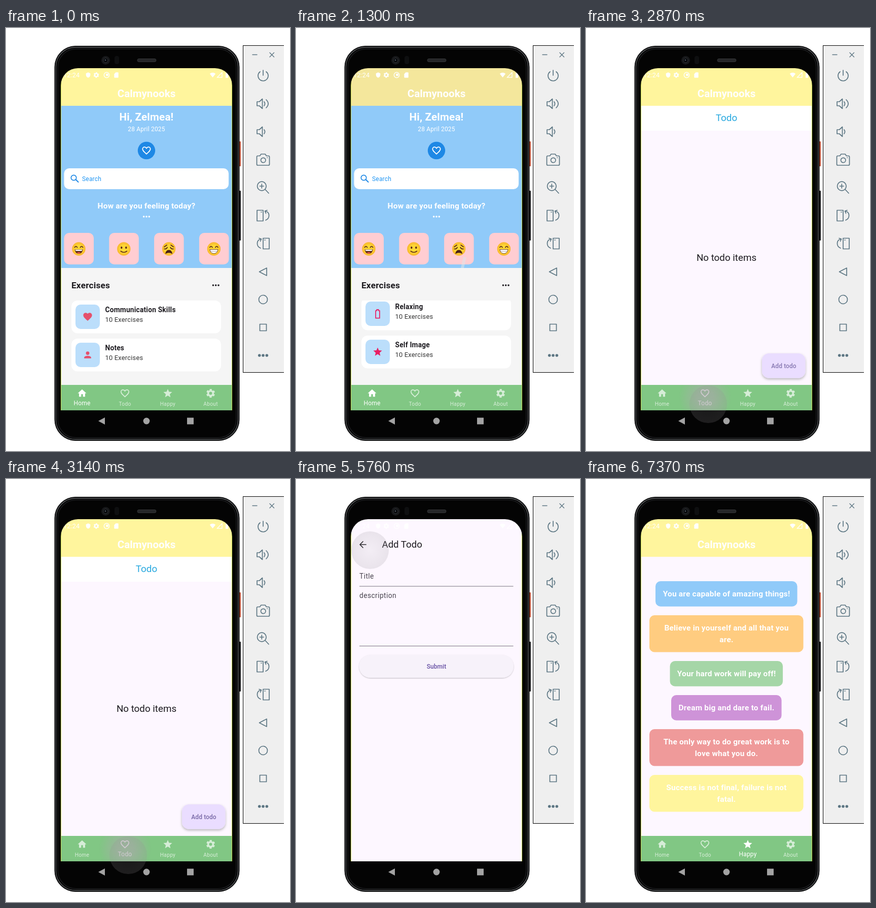
An HTML page for the animation above (8000 ms loop, 560 by 832 pixels).

```html
<!DOCTYPE html>
<html lang="en">
<head>
<meta charset="utf-8">
<title>Mood app demo</title>
<style>
html, body { margin: 0; width: 100%; height: 100%; overflow: hidden; background: #fff; }
svg { display: block; width: 560px; height: 832px; font-family: Roboto, sans-serif; }
.mid { text-anchor: middle; }
.line { fill: none; stroke: currentColor; stroke-linecap: round; stroke-linejoin: round; }

#home, #todo, #add, #happy, #list, #todo .fab-label, .bar, .tap, .swipe, .ghost, .tint, .glow, .press {
  animation: 8s linear infinite;
}
#todo, #add { transform-origin: 277px 415px; }
#home { animation-name: home; animation-timing-function: step-end; }
#happy { animation-name: happy; animation-timing-function: step-end; }
#todo { animation-name: todo; }
#add { animation-name: add; }
#list { animation-name: scroll; }
.tint { animation-name: tint; animation-timing-function: step-end; }
.bar { animation-name: bar; }
#todo .fab-label { animation-name: label; }
.press { animation-name: press; }
.swipe { fill: none; stroke: #e6ebee; stroke-width: 8; stroke-opacity: .6; stroke-dasharray: 50 400; animation-name: swipe; }
.ghost { fill: #dfe6ea; fill-opacity: .55; animation-timing-function: step-end; }
.up { animation-name: ghost-up; }
.down { animation-name: ghost-down; }
.tap-todo { animation-name: tap-todo; }
.tap-fab { animation-name: tap-fab; }
.tap-back { animation-name: tap-back; }
.tap-happy { animation-name: tap-happy; }

@keyframes home { 0% { visibility: visible } 35.125%, 100% { visibility: hidden } }
@keyframes happy { 0% { visibility: hidden } 87%, 100% { visibility: visible } }
@keyframes todo {
  0%, 53.75% { transform: scale(1); animation-timing-function: cubic-bezier(.2, 0, 0, 1) }
  58%, 72.87% { transform: scale(1.05) }
  72.875% { transform: scale(1.1); animation-timing-function: cubic-bezier(.2, 0, 0, 1) }
  77.1%, 100% { transform: scale(1) }
}
@keyframes add {
  0%, 53.75% { opacity: 0; transform: scale(.85) }
  54.2% { opacity: 0; transform: scale(.87) }
  54.9% { opacity: 1; transform: scale(.95); animation-timing-function: ease-out }
  58%, 72.875% { opacity: 1; transform: scale(1) }
  73.2% { opacity: 1; transform: scale(.99) }
  74% { opacity: 0; transform: scale(.94) }
  77%, 100% { opacity: 0; transform: scale(.9) }
}
@keyframes scroll {
  0%, 6.25% { transform: none; animation-timing-function: cubic-bezier(.3, 0, .4, 1) }
  15.5%, 16.875% { transform: translateY(-156px); animation-timing-function: cubic-bezier(.35, 0, .3, 1) }
  27.625% { transform: translateY(-3px); animation-timing-function: ease-out }
  30%, 100% { transform: none }
}
@keyframes tint { 0% { color: #e5506c } 6.25%, 100% { color: #e91e63 } }
@keyframes bar {
  0%, 7% { fill: #fff59d }
  9.5%, 29.5% { fill: #f4e79c }
  32%, 100% { fill: #fff59d }
}
@keyframes label { 0%, 35.125% { fill: #8b7cb4 } 39.25% { fill: #7868a6 } 45%, 100% { fill: #4f378b } }
@keyframes press { 0%, 52.87% { opacity: 0 } 52.875%, 56% { opacity: 1 } 58%, 100% { opacity: 0 } }
@keyframes swipe {
  0%, 6.25% { stroke-dashoffset: -184 }
  11% { stroke-dashoffset: 50 }
  16.875% { stroke-dashoffset: 50 }
  22%, 100% { stroke-dashoffset: -184 }
}
@keyframes ghost-up { 0% { opacity: 0 } 11% { opacity: 1 } 35%, 100% { opacity: 0 } }
@keyframes ghost-down { 0% { opacity: 0 } 20% { opacity: 1 } 35%, 100% { opacity: 0 } }
@keyframes tap-todo { 0%, 32% { opacity: 0 } 33.5%, 39.25% { opacity: 1 } 44.5%, 100% { opacity: 0 } }
@keyframes tap-fab { 0%, 52.87% { opacity: 0 } 52.875% { opacity: .25 } 53.8% { opacity: 1 } 57.5%, 100% { opacity: 0 } }
@keyframes tap-back { 0%, 71.99% { opacity: 0 } 72%, 73.5% { opacity: 1 } 77%, 100% { opacity: 0 } }
@keyframes tap-happy { 0%, 84.49% { opacity: 0 } 84.5% { opacity: .6 } 85.5%, 88% { opacity: 1 } 92%, 100% { opacity: 0 } }
</style>
</head>
<body>
<svg id="stage" viewBox="0 0 560 832"></svg>
<script>
const shapes = {
  home: 'M10 20v-6h4v6h5v-8h3L12 3 2 12h3v8z',
  star: 'M12 17.3L18.2 21l-1.6-7L22 9.2l-7.2-.6L12 2 9.2 8.6 2 9.2 7.5 14 5.8 21z',
  heart: 'M12 21.3l-1.5-1.3C5.4 15.4 2 12.3 2 8.5 2 5.4 4.4 3 7.5 3c1.7 0 3.4.8 4.5 2.1C13.1 3.8 14.8 3 16.5 3 19.6 3 22 5.4 22 8.5c0 3.8-3.4 6.9-8.5 11.5z',
  heartLine: 'M12 20C6 14.6 3 12 3 8.5 3 6 5 4 7.5 4c1.8 0 3.5 1 4.5 2.8C13 5 14.7 4 16.5 4 19 4 21 6 21 8.5c0 3.500-3 6.100-9 11.500z',
  person: 'M8 8a4 4 0 1 0 8 0a4 4 0 1 0-8 0M12 14c-2.700 0-8 1.300-8 4v2h16v-2c0-2.700-5.300-4-8-4z',
  shield: 'M12 1L3 5v6c0 5.500 3.800 10.700 9 12 5.200-1.300 9-6.500 9-12V5z',
  card: 'M18 2h-8L4 8v12q0 2 2 2h12q2 0 2-2V4q0-2-2-2z',
  battery: 'M10 2.500h4v2.500h2.500v17h-9V5h2.500z',
  wifi: 'M12 21L1 7Q12-1 23 7z',
  signal: 'M22 3v19H3z'
};
const rect = (x, y, w, h, fill, r = 0, more = '') =>
  `<rect x="${x}" y="${y}" width="${w}" height="${h}" rx="${r}" fill="${fill}" ${more}/>`;
const disc = (x, y, r, fill, more = '') => `<circle cx="${x}" cy="${y}" r="${r}" fill="${fill}" ${more}/>`;
const text = (x, y, str, size, { weight = 400, fill = '#fff', gap = .2, cls = 'mid' } = {}) =>
  `<text x="${x}" y="${y}" class="${cls}" font-size="${size}" font-weight="${weight}" letter-spacing="${gap}" fill="${fill}">${str}</text>`;
const place = (x, y, size, body, more = '') =>
  `<g transform="translate(${x - size / 2} ${y - size / 2}) scale(${size / 24})" ${more}>${body}</g>`;
const icon = (name, x, y, size, fill = '#fff') => place(x, y, size, `<path d="${shapes[name]}" fill="${fill}"/>`);
const outline = (name, x, y, size, color = '#fff', width = 2) =>
  place(x, y, size, `<path d="${shapes[name]}" fill="none" stroke="${color}" stroke-width="${width}"/>`);
const gear = (x, y, size) => place(x, y, size,
  `<g fill="none" stroke="#fff"><circle cx="12" cy="12" r="5.600" stroke-width="4.200"/>
   <circle cx="12" cy="12" r="8.500" stroke-width="3" stroke-dasharray="4.900 4" stroke-dashoffset="-2"/></g>`);
const dots = (x, y, fill, r = 1.8, step = 5.3) => [-step, 0, step].map(d => disc(x + d, y, r, fill)).join('');
const line = (d, width = 1.7) => `<path class="line" d="${d}" stroke-width="${width}"/>`;

const navItems = [
  ['Home', (x, y) => icon('home', x, y, 20.6)],
  ['Todo', (x, y) => outline('heartLine', x, y, 20.6)],
  ['Happy', (x, y) => icon('star', x, y, 20.6)],
  ['About', (x, y) => gear(x, y, 20.6)]
];
const nav = active => rect(108, 702, 338, 50, '#81c784') + navItems.map(([name, draw], i) => {
  const x = 150 + i * 84.5, on = i === active;
  return `<g opacity="${on ? 1 : .68}">${draw(x, 718.5)}${text(x, on ? 742 : 742.5, name, on ? 12 : 10.3)}</g>`;
}).join('');

const header = rect(108, 79, 338, 74, '#fff59d', 0, 'class="bar"') +
  text(277, 136, 'Calmynooks', 20.6, { weight: 700, gap: 0 });

const mouthOpen = '<path d="M-8 1H8Q7 9.500 0 9.500T-8 1z" fill="#5b2a1c"/>';
const eyesSmile = '<path class="line" d="M-8-3q2.500-4 5 0M3-3q2.500-4 5 0" stroke-width="1.700"/>';
const faces = [
  eyesSmile + mouthOpen + '<path d="M-7 1.500H7L6 4H-6z" fill="#fff"/><path d="M-4 8Q0 4.500 4 8Q0 10.500-4 8z" fill="#e8503f"/>',
  '<ellipse cx="-4.500" cy="-2.500" rx="1.700" ry="2.300" fill="#5b2a1c"/><ellipse cx="4.500" cy="-2.500" rx="1.700" ry="2.300" fill="#5b2a1c"/><path class="line" d="M-6 4.500Q0 9 6 4.500" stroke-width="1.700"/>',
  '<path class="line" d="M-9-4L-4-7.500M9-4L4-7.500M-9 0Q-5 1-3-3M9 0Q5 1 3-3" stroke-width="1.700"/><path d="M-7 10Q-6 2 0 2T7 10Q0 5.500-7 10z" fill="#4b2118"/>',
  eyesSmile + '<path d="M-8 1H8Q7 9 0 9T-8 1z" fill="#fff" stroke="#7a4a22"/><path d="M-7 4.500H7" stroke="#a99"/>'
];
const moods = faces.map((face, i) => {
  const x = 114.5 + i * 88.8;
  return rect(x, 403, 58.5, 62, '#ffcdd2', 10) +
    `<g transform="translate(${x + 29} 434.500)" color="#5b2a1c">${disc(0, 0, 13.2, 'url(#skin)')}${face}</g>`;
}).join('');

const exercises = [
  ['Communication Skills', 'heart'], ['Notes', 'person'], ['Relaxing', 'battery'], ['Self Image', 'star']
].map(([name, shape], i) => {
  const y = 536 + i * 75;
  const draw = shape === 'battery' ? outline : icon;
  return rect(129, y, 295, 64.5, '#fff', 12) + rect(137, y + 8, 48, 48, '#bbdefb', 10) +
    draw(shape, 161, y + 32, 20.6, 'currentColor') +
    text(195.5, y + 22.5, name, 13.76, { weight: 700, fill: '#1d1b20', cls: '' }) +
    text(195.5, y + 41.5, '10 Exercises', 12.9, { fill: '#333', cls: '' });
}).join('');

const home = `<g id="home">
  ${rect(108, 153, 338, 319, '#90caf9')}${rect(108, 472, 338, 230, '#f5f5f5')}${header}
  ${text(277, 181.5, 'Hi, Zelmea!', 20.6, { weight: 700 })}
  ${text(277, 202.5, '28 April 2025', 12)}
  ${disc(277, 241, 17.2, '#1e88e5')}${outline('heartLine', 277, 241, 20.6)}
  ${rect(114.5, 276, 324.5, 41, '#fff', 10)}
  <g color="#1e88e5">${line('M138 298.500L142.500 303', 1.9)}<circle class="line" cx="133.500" cy="294.500" r="5.200" stroke-width="1.700"/></g>
  ${text(150, 300.5, 'Search', 12, { fill: '#2196f3', cls: '' })}
  ${text(277, 355, 'How are you feeling today?', 15.48, { weight: 700 })}
  ${dots(277, 371, '#fff')}${moods}
  ${text(129, 512, 'Exercises', 17.2, { weight: 700, fill: '#1d1b20', cls: '' })}
  ${dots(413.7, 506, '#1d1b20')}
  <g clip-path="url(#viewport)"><g id="list" ><g class="tint">${exercises}</g></g></g>
  <path class="ghost up" d="M330 450l6 1-5 21h-6z"/>
  <path class="ghost down" d="M334 420l6 1-4 49h-9zM315 566l5 1-5 35-7-1z"/>
  <path class="swipe" d="M337 420L312 602"/>
  ${nav(0)}</g>`;

const todo = `<g id="todo">
  ${rect(108, 79, 338, 673, '#fdf7ff')}${header}${rect(108, 153, 338, 49, '#fff')}
  ${text(277, 183, 'Todo', 18.9, { fill: '#29a9df', gap: 0 })}
  ${text(277, 458, 'No todo items', 18.8, { fill: '#1d1b20', gap: 0 })}
  ${rect(347, 640, 85.5, 48.5, '#eaddff', 13.8, 'filter="url(#lift)"')}
  ${rect(347, 640, 85.5, 48.5, '#4f378b', 13.8, 'fill-opacity=".04" class="press"')}
  ${text(390, 668.5, 'Add todo', 12, { weight: 500, gap: .09, cls: 'mid fab-label' })}
  ${nav(1)}
  <g clip-path="url(#navArea)">${disc(235, 727, 52, 'url(#splash)', 'class="tap tap-todo"')}</g></g>`;

const field = { fill: '#49454f', gap: .43, cls: '' };
const add = `<g id="add">
  ${rect(108, 79, 338, 673, '#fdf7ff')}
  <g color="#1d1b20">${line('M138 129H126.500M132 123L126 129L132 135')}</g>
  ${text(169.5, 135, 'Add Todo', 18.6, { fill: '#1d1b20', gap: 0, cls: '' })}
  ${text(125, 195.5, 'Title', 13.76, field)}${text(125, 233.5, 'description', 13.76, field)}
  ${rect(125, 210.5, 303.5, 1, '#79747e')}${rect(125, 328, 303.5, 1, '#79747e')}
  ${rect(124.5, 346, 304.5, 45, '#f7f2fa', 22.5, 'filter="url(#low)"')}
  ${text(277, 373, 'Submit', 12, { weight: 500, fill: '#6750a4', gap: .09 })}</g>`;

const quotes = [
  [137, 201, '#90caf9', 'You are capable of amazing things!'],
  [125, 268, '#ffcc80', 'Believe in yourself and all that you', 'are.'],
  [165.5, 358, '#a5d6a7', 'Your hard work will pay off!'],
  [168, 425, '#ce93d8', 'Dream big and dare to fail.'],
  [125, 492, '#ef9a9a', 'The only way to do great work is to', 'love what you do.'],
  [125, 582, '#fff59d', 'Success is not final, failure is not', 'fatal.']
].map(([x, y, fill, ...lines]) =>
  rect(x, y, 2 * (276.8 - x), lines.length > 1 ? 72.5 : 49.7, fill, 10) +
  lines.map((str, i) => text(277, y + 30.3 + i * 22.4, str, 15.48, { weight: 700 })).join('')).join('');
const happy = `<g id="happy">${rect(108, 79, 338, 673, '#fdf7ff')}${header}${quotes}${nav(2)}</g>`;

const status = text(113, 97, '12:24', 12.6, { cls: '' }) + icon('shield', 162, 92.5, 11.5) + gear(178, 92.5, 13) +
  `<circle cx="198.500" cy="92.500" r="5.200" fill="none" stroke="#fff" stroke-width="1.400"/>` + disc(199.5, 92, 2.5, '#fff') +
  icon('card', 217.5, 92.5, 12.5) + icon('wifi', 407.5, 92.5, 12.5) + outline('signal', 421, 92, 12, '#fff', 2.5) +
  icon('battery', 435.5, 92.5, 13);

const phone = rect(459, 223, 4, 49, '#c4583f', 1) + rect(459, 320, 4, 98, '#1c1c1e', 1) +
  rect(96, 35.5, 364, 776, '#17181a', 41, 'stroke="#050505"') +
  rect(98.5, 38, 359, 771, '#000', 38.5, 'stroke="#56585a" stroke-width="1.300"') +
  rect(102, 41, 352, 765, '#040404', 36, 'stroke="#17181a" stroke-width="2"') +
  disc(196.5, 63.5, 8.5, '#17181a') + disc(196.5, 63.5, 4.5, '#050608', 'stroke="#34383c"') + disc(196, 63, 1.5, '#49515c') +
  rect(214, 55, 9, 16, '#0e0f10', 4) + rect(259, 60.5, 37, 6, '#252628', 3, 'stroke="#3c3d3f" stroke-width=".800"') +
  `<path d="M195 766v14l-13-7z" fill="#a3a3a3"/>` + disc(277, 773, 6.4, '#a3a3a3') + rect(357, 766.5, 13, 13, '#a3a3a3');

const speaker = y => `M495 ${y - 4}h4.500l6-5.500v19l-6-5.500h-4.500zM509 ${y - 4}q3 4 0 8`;
const rotate = 'M495 358.500h12v21h-12zM503 362h1M512 378Q519 375 518.500 368T511 360.500M515 358.500l-4.500 1.500 2 4.500';
const panel = rect(467, 34, 81, 644, '#000') + rect(468, 35, 80, 642, '#efefef') + `<g color="#5c7683">
  ${line('M486 52.500h9M520 48.500l8.500 8.500M528.500 48.500L520 57', 1.4)}
  ${line('M507 83v10M501 86a10 10 0 1 0 12 0')}
  ${line(speaker(149) + 'M513 141q8 8 0 16')}${line(speaker(204))}
  ${line('M496.500 251.500h4l2.500-3.500h8l2.500 3.500h4q2 0 2 2v14.500q0 2-2 2h-21q-2 0-2-2V253.500q0-2 2-2zM515 255h.500M502.500 260a4.700 4.700 0 1 0 9.400 0a4.700 4.700 0 1 0-9.400 0')}
  ${line('M495.500 311a8.800 8.800 0 1 0 17.600 0a8.800 8.800 0 1 0-17.600 0M511 317.500L518 325M500.500 311h7.600M504.300 307.200v7.600')}
  ${line(rotate)}<g transform="translate(1014 55)  scale(-1 1)">${line(rotate)}</g>
  ${line('M514 472v15l-14.500-7.500z')}${line('M498.500 534a8.500 8.500 0 1 0 17 0a8.500 8.500 0 1 0-17 0')}${line('M500.500 582.500h13v13h-13z')}
  ${dots(507, 644, '#5c7683', 2.8, 7.3)}</g>`;

const tap = (name, x, y, r) => disc(x, y, r, 'url(#touch)', `class="tap tap-${name}"`);
const screenPath = 'M108 752V113a34 34 0 0 1 34-34H412a34 34 0 0 1 34 34V752z';
const shadow = (id, dy, blur, alpha) => `<filter id="${id}" x="-20%" y="-20%" width="140%" height="160%">
  <feDropShadow dx="0" dy="${dy}" stdDeviation="${blur}" flood-opacity="${alpha}"/></filter>`;

document.getElementById('stage').innerHTML = `<defs>
  <clipPath id="screen"><path d="${screenPath}"/></clipPath>
  <clipPath id="viewport"><rect x="108" y="536" width="338" height="145"/></clipPath>
  <clipPath id="navArea"><rect x="108" y="702" width="338" height="50"/></clipPath>
  <radialGradient id="skin"><stop offset=".5" stop-color="#fdd835"/><stop offset="1" stop-color="#f8b62c"/></radialGradient>
  <radialGradient id="touch"><stop offset="0" stop-color="#a8a4a8" stop-opacity=".12"/><stop offset="1" stop-color="#969196" stop-opacity=".19"/></radialGradient>
  <radialGradient id="splash"><stop offset=".3" stop-color="#b4a5b4" stop-opacity=".5"/><stop offset="1" stop-color="#b4a5b4" stop-opacity="0"/></radialGradient>
  ${shadow('lift', 2.5, 2.5, .28)}${shadow('low', 1, .8, .25)}</defs>
  ${rect(0, 0, 560, 832, '#fff')}${phone}
  <g clip-path="url(#screen)">${todo}${home}${happy}${add}${status}
    ${rect(108, 79, 1, 673, '#c3d84a')}${rect(445, 79, 1, 673, '#c3d84a')}</g>
  ${tap('todo', 241, 740, 37)}${tap('fab', 393, 672, 32)}${tap('back', 146, 140, 37)}${tap('happy', 321, 735, 37)}
  ${panel}`;
</script>
</body>
</html>
```
